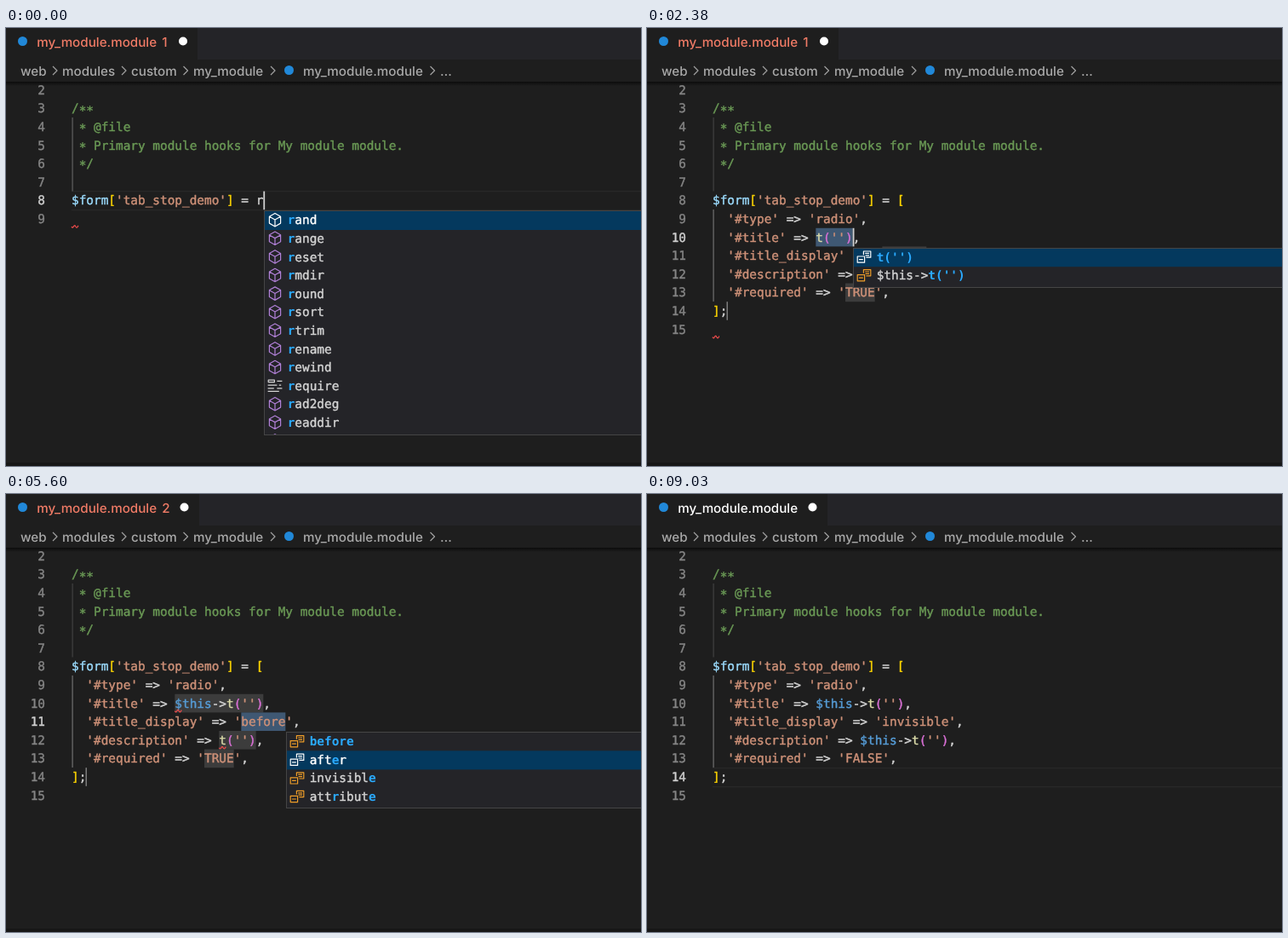
Animation, 746 px wide and 514 px high, one loop 9.17 s. Source, as an HTML page with a canvas:

```html
<!DOCTYPE html>
<html lang="en">
<head>
<meta charset="utf-8">
<title>Tab stop demo</title>
<style>
html, body { margin: 0; height: 100%; overflow: hidden; background: #1e1e1e; }
canvas { display: block; }
</style>
</head>
<body>
<canvas id="stage" width="746" height="514"></canvas>
<script>
const ctx = document.getElementById('stage').getContext('2d');
const LOOP = 9170, BLINK = 490;
const LEFT = 77, CHAR = 8.667, ROW = 21.6;
const MONO = '14.4px "DejaVu Sans Mono", monospace';
const SANS = '500 15.2px Inter, sans-serif';
const TEXT = '#d4d4d4', GREEN = '#6a9955', STRING = '#ce9178', BLUE = '#2aaaff', LOGO = '#2188d8', PANEL = '#242428';

const INSERTED = 2380, DONE = 8540;
const CALL = "t('')", METHOD = "$this->t('')";
const HEADER = ['', '/**', ' * @file', ' * Primary module hooks for My module module.', ' */', ''];
const ASSIGN = "$form['tab_stop_demo'] = ";

// Typed text over time
const TYPING = [[0, 'r'], [70, 'ra'], [280, 'rad'], [490, 'radi'], [980, 'radio']];

// Error count in the tab, over time
const ERRORS = [[0, 1], [3220, 2], [5740, 1], [8330, 0]];

// Each tab stop: value before and after, active period, menu choices over time
const callItems = ["e:*t('')*", "e:$this->*t('')*"];
const FIELDS = [
  { line: 10, head: "  '#title' => ", tail: ',', values: [CALL, METHOD], from: INSERTED, to: 4970,
    picks: [[0, 0], [3780, 1], [4200, 0], [4480, 1]], items: callItems, error: [3290, 5670] },
  { line: 11, head: "  '#title_display' => '", tail: "',", values: ['before', 'invisible'], from: 4970, to: 6370,
    picks: [[0, 0], [5600, 1], [5950, 2]], items: ['e:*before*', 'e:aft*e*r', 'e:invisibl*e*', 'e:att*r*ibut*e*'] },
  { line: 12, head: "  '#description' => ", tail: ',', values: [CALL, METHOD], from: 6370, to: 7350,
    picks: [[0, 0], [6930, 1]], items: callItems, error: [3290, 8120] },
  { line: 13, head: "  '#required' => '", tail: "',", values: ['TRUE', 'FALSE'], from: 7350, to: DONE,
    picks: [[0, 0], [8260, 1]], items: ['e:*TRUE*', 'e:FALS*E*'] },
];

const R_ITEMS = ['f:rand', 'f:range', 'f:reset', 'f:rmdir', 'f:round', 'f:rsort', 'f:rtrim', 'f:rename',
  'f:rewind', 'k:require', 'f:rad2deg', 'f:readdir', 'f:readfile'];
const RA_ITEMS = ['f:rand', 'f:range', 'f:rad2deg', 'f:random_int', 'f:random_bytes', 'f:rawurlencode', 'f:rawurldecode'];
const PLUGIN = String.raw` [Drupal\webform\Plugin\WebformElement]`;
const ELEMENT = String.raw` [Drupal\webform\Element]`;
const RADIO_ITEMS = ['s:radio', 's:radios', 'c:Radio', String.raw`c:Radios [Drupal\Core\Render\Element]`,
  'c:Radios' + PLUGIN, 'f:*ra*n*do*m_*i*nt', 'c:WebformRadiosOther' + ELEMENT, 'c:WebformRadiosOther' + PLUGIN,
  'c:FormTestRadiosCheckedForm', 'c:WebformEntityRadios' + ELEMENT, 'c:WebformEntityRadios' + PLUGIN,
  'c:WebformElementRadiosTest', 's:webform_radios'];

// Icons on a 16 unit grid
const ICONS = {
  f: ['#b180d7', 'M8 1.4 13.5 4.5v6.6L8 14.3 2.5 11.1V4.5zM2.5 4.6 8 7.7 13.5 4.6M8 7.7v6.6'],
  c: ['#ee9d28', 'M5.4 1.4l2 2-4 4-2-2zM5.4 5.7v6.6h5M5.4 7.3h5M13 5.4l1.3 1.3-2.6 2.6L10.4 8zM13 10.4l1.3 1.3-2.6 2.6-1.3-1.3z'],
  e: ['#ee9d28', 'M7.5 6V2.5h7v6H10M9 4.5h4M9.3 6.5H13M1.5 7.5h7v6h-7zM3 10.5h4'],
  s: [TEXT, 'M2.5 13V1.5h12V13M2 14.5h1m1 0h1m1 0h1m1 0h1m1 0h1m1 0h1m1 0h1'],
  k: [TEXT, 'M1.5 2.5h6v2h-6zM10 3.5h5M1 7.5h9M12 7.5h2M1 10.5h6M10 10.5h5M1 13.5h11'],
};
for (const icon of Object.values(ICONS)) icon[1] = new Path2D(icon[1]);

const at = (steps, t) => steps.filter(([time]) => time <= t).pop()[1];
const centerOf = line => 202.4 + (line - 8) * ROW;
const colX = col => LEFT + col * CHAR;

function rect(x, y, w, h, color) {
  ctx.fillStyle = color;
  ctx.fillRect(x, y, w, h);
}

function circle(x, y, r, color) {
  ctx.fillStyle = color;
  ctx.beginPath();
  ctx.arc(x, y, r, 0, 7);
  ctx.fill();
}

function label(text, x, y, color) {
  ctx.font = SANS;
  ctx.fillStyle = color;
  ctx.fillText(text, x, y);
}

// Fixed-pitch text, slightly thickened; returns the x after the last character
function mono(text, x, center, color, bold) {
  ctx.font = (bold ? 'bold ' : '') + MONO;
  ctx.fillStyle = ctx.strokeStyle = color;
  ctx.lineWidth = 0.4;
  for (const c of text) {
    const y = center + (c === '*' ? 7.2 : 5);
    ctx.fillText(c, x, y);
    if (!bold) ctx.strokeText(c, x, y);
    x += CHAR;
  }
  return x;
}

function tokenColor(token) {
  if (token === '$this') return '#569cd6';
  if (token[0] === '$') return '#9cdcfe';
  if (token[0] === "'") return STRING;
  if (token === 't') return '#dcdcaa';
  if (/[[\]]/.test(token)) return '#ffd700';
  if (/[()]/.test(token)) return '#da70d6';
  return TEXT;
}

function codeLine(text, line) {
  const center = centerOf(line);
  if (/^( \*|\/\*)/.test(text)) return mono(text, LEFT, center, GREEN);
  let x = LEFT;
  for (const token of text.match(/'[^']*'|\$\w+|t(?=\()|[^]/g) || []) x = mono(token, x, center, tokenColor(token));
  return x;
}

function squiggle(x, line) {
  const y = centerOf(line) + 9;
  ctx.strokeStyle = '#f14c4c';
  ctx.lineWidth = 1.2;
  ctx.beginPath();
  for (let i = 0; i <= 8; i += 0.5) ctx.lineTo(x + i, y + 1.3 * Math.sin(i * 1.3));
  ctx.stroke();
}

function menu(x, line, items, selected) {
  const anchor = centerOf(line) + 12, top = Math.round(anchor);
  const height = Math.round(Math.min(items.length * ROW + 4, 264));
  rect(x, top, 746 - x, height, '#454545');
  ctx.save();
  ctx.beginPath();
  ctx.rect(x + 1, top + 1, 746 - x, height - 2);
  ctx.clip();
  rect(x, top, 746 - x, height, PANEL);
  rect(x + 1, anchor + 0.5 + selected * ROW, 746 - x, ROW + 0.5, '#04395e');
  items.forEach((item, i) => {
    const center = anchor + 11 + i * ROW, [color, path] = ICONS[item[0]];
    ctx.save();
    ctx.translate(x + 3.4, center - 9.6);
    ctx.scale(1.2, 1.2);
    ctx.strokeStyle = i === selected ? '#fff' : color;
    ctx.lineWidth = 1;
    ctx.stroke(path);
    ctx.restore();
    let textX = x + 27.7;
    item.slice(2).split('*').forEach((part, n) => {
      textX = mono(part, textX, center, n % 2 ? BLUE : i === selected ? '#fff' : TEXT, n % 2);
    });
  });
  ctx.restore();
}

function cursor(x, line, elapsed) {
  if (Math.floor(elapsed / BLINK) % 2 === 0) rect(x, centerOf(line) - 10.8, 1.8, ROW, '#d0d0d0');
}

function lineNumbers(last, active) {
  for (let n = 2; n <= last; n++) {
    const text = String(n);
    mono(text, 46 - text.length * CHAR, centerOf(n), n === active ? '#d0d0d0' : '#858585');
  }
}

function activeLine(line) {
  for (const dy of [-11, 10.5]) rect(LEFT, Math.round(centerOf(line) + dy), 669, 1.2, '#282828');
}

function chrome(t) {
  const errors = at(ERRORS, t);
  const [tabWidth, dotX] = [[212, 194.5], [225, 208], [227, 209.5]][errors];
  const color = errors ? '#f07b66' : '#fff';
  rect(tabWidth, 0, 746, 37, PANEL);
  circle(19.5, 15.5, 5.5, LOGO);
  label('my_module.module', 36.3, 21.5, color);
  if (errors) label(errors, 183.2, 21.5, color);
  circle(dotX, 15.5, 5, '#fff');

  const crumbs = [['web', 17], ['modules', 66], ['custom', 147], ['my_module', 220], ['my_module.module', 349], ['…', 510]];
  for (const [text, x] of crumbs) label(text, x, 56, '#a9a9a9');
  circle(332.5, 49.5, 5.5, LOGO);
  ctx.strokeStyle = '#a0a0a0';
  ctx.lineWidth = 1.2;
  for (const x of [55, 136, 208.5, 311, 498.5]) {
    ctx.beginPath();
    ctx.moveTo(x, 45);
    ctx.lineTo(x + 5, 50);
    ctx.lineTo(x, 55);
    ctx.stroke();
  }
  const shadow = ctx.createLinearGradient(0, 63, 0, 68);
  shadow.addColorStop(0, '#0c0c0c');
  shadow.addColorStop(1, '#1e1e1e');
  rect(0, 63, 746, 5, shadow);
  rect(0, 510, 746, 4, '#171717');
}

function typingScene(t) {
  const typed = at(TYPING, t);
  const lastKey = TYPING.filter(([time]) => time <= t).pop()[0];
  const source = typed === 'r' ? R_ITEMS : typed === 'ra' ? RA_ITEMS : RADIO_ITEMS;
  const items = source.map(s => s.slice(0, 2) + s.slice(2).replace(RegExp(typed, 'i'), '*$&*'));
  activeLine(8);
  lineNumbers(9, 8);
  rect(77.5, 105, 1.2, 86.5, '#606060');
  const x = codeLine(ASSIGN + typed, 8);
  squiggle(LEFT, 9);
  menu(Math.round(x + 0.5), 8, items, 0);
  cursor(x, 8, t - lastKey);
}

function snippetScene(t) {
  const current = FIELDS.find(f => t < f.to);
  if (!current) activeLine(14);
  lineNumbers(15, current ? current.line : 14);
  rect(77.5, 105, 1.2, 86.5, '#404040');
  rect(77.5, 213, 1.2, 108, '#707070');
  codeLine(ASSIGN + '[', 8);
  codeLine("  '#type' => 'radio',", 9);

  let end;
  for (const field of FIELDS) {
    const value = field.values[t < field.to ? 0 : 1];
    const x = colX(field.head.length), width = value.length * CHAR;
    if (current) rect(x, centerOf(field.line) - 10.8, width, ROW, field === current ? '#3f5873' : '#3c3c3c');
    codeLine(field.head + value + field.tail, field.line);
    if (field.error && t >= field.error[0] && t < field.error[1]) squiggle(x, field.line);
    if (field === current) end = x + width;
  }
  codeLine('];', 14);
  if (t < 3150) squiggle(LEFT, 15);

  if (current) {
    rect(93.5, centerOf(14) - 10.8, 1.5, ROW, '#7c7c7c');
    menu(Math.round(end + 0.5), current.line, current.items, at(current.picks, t));
    cursor(end, current.line, t - current.from);
  } else {
    cursor(colX(2), 14, t - DONE);
  }
}

function draw(t) {
  ctx.textRendering = 'geometricPrecision';
  ctx.lineJoin = 'round';
  rect(0, 0, 746, 514, '#1e1e1e');
  chrome(t);
  HEADER.forEach((text, i) => codeLine(text, i + 2));
  if (t < INSERTED) typingScene(t);
  else snippetScene(t);
}

const start = performance.now();
function tick() {
  draw((performance.now() - start) % LOOP);
  requestAnimationFrame(tick);
}
tick();
</script>
</body>
</html>
```
